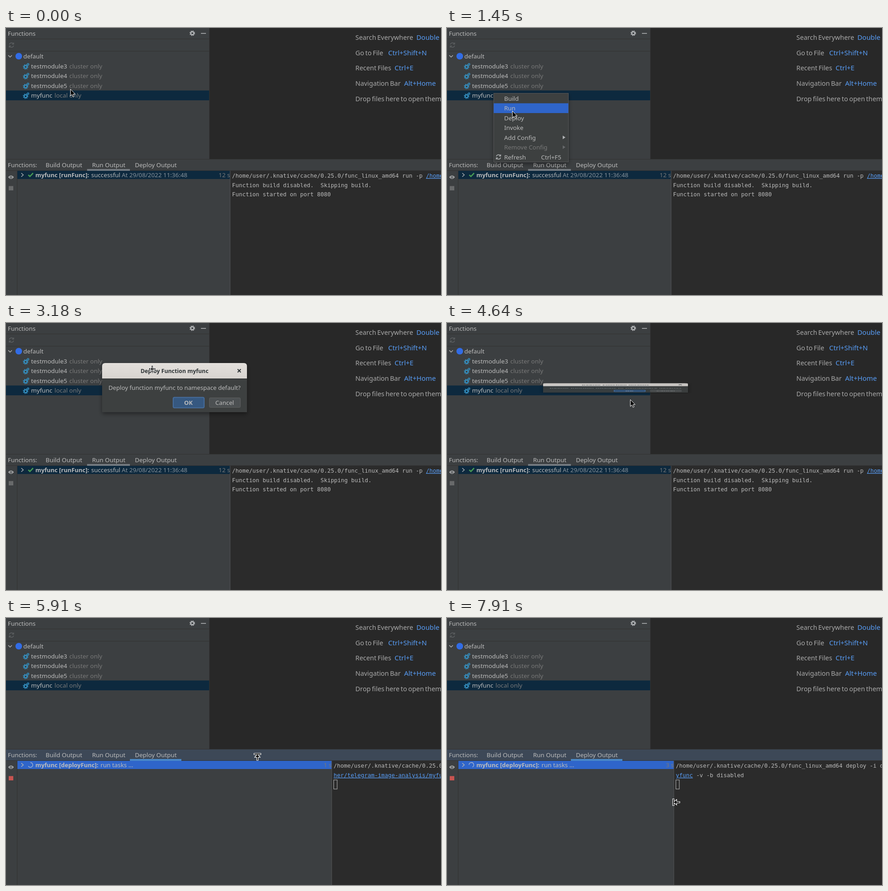
An HTML page for the animation above (8 s loop, 955 by 587 pixels).

```html
<!DOCTYPE html>
<html lang="en">
<head>
<meta charset="utf-8">
<title>Deploy a function</title>
<style>
  html, body { margin: 0; width: 100%; height: 100%; overflow: hidden; background: #3c3f41; }
  svg { display: block; width: 955px; height: 587px; }
  text { font: 13.35px "Noto Sans", "Open Sans", sans-serif; fill: #bbb; white-space: pre; }
  text.b { font-weight: 700; font-size: 12.95px; }
  text.mono { font: 12.42px "DejaVu Sans Mono", "Noto Sans Mono", monospace; }
  text.tip { font-size: 14.4px; word-spacing: -1.2px; fill: #a9a9a9; }
  text.key { font-size: 14.9px; word-spacing: -1.2px; fill: #589df6; }
  text.dim { fill: #787878; }
  text.ask { font-size: 13.15px; }
  text.title { font-size: 12.3px; font-weight: 700; fill: #2e3436; }
  .link { fill: #589df6; text-decoration: underline; }
</style>
</head>
<body>
<svg viewBox="0 0 955 587" xmlns="http://www.w3.org/2000/svg">
  <defs>
    <linearGradient id="bar" x2="0" y2="1">
      <stop stop-color="#e3dfdb"/><stop offset="1" stop-color="#d8d4d0"/>
    </linearGradient>
    <filter id="shade" x="-20%" y="-30%" width="140%" height="170%">
      <feDropShadow dx="0" dy="4" stdDeviation="5" flood-color="#000" flood-opacity=".4"/>
    </filter>
    <g id="refresh" fill="none" stroke-width="1.5">
      <path d="M-4.8-1.2A5 5 0 0 1 4-3M4.8 1.2A5 5 0 0 1-4 3"/>
      <path d="M4.8-5.5V-2H1.2M-4.8 5.5V2H-1.2"/>
    </g>
    <g id="gears" fill="none" stroke="#3592c4">
      <circle r="3.1" stroke-width="2"/>
      <circle r="4.9" stroke-width="2" stroke-dasharray="1.9 1.95"/>
      <circle cx="5.3" cy="-5.6" r="1.5" stroke-width="1.2"/>
      <circle cx="5.3" cy="-5.6" r="2.5" stroke-width="1.1" stroke-dasharray="1.3 1.32"/>
    </g>
    <path id="arrow" d="M.5.5V15.3L4 12.1 6.3 17.5 8.8 16.4 6.5 11.2H11Z" stroke="#fff" stroke-linejoin="round"/>
    <path id="edge" d="M-7.5-7.5H7.5V-4.5H1.2L6 1.2H1.5V8H-1.5V1.2H-6L-1.2-4.5H-7.5Z" stroke="#fff" stroke-width="1.2"/>
    <g id="move" stroke="#fff" stroke-linejoin="round">
      <path d="M0-8 3.5-4.2H-3.5ZM0 8 3.5 4.2H-3.5ZM-8 0-4.2-3.5V3.5ZM8 0 4.2-3.5V3.5Z"/>
      <circle r="3.6"/><circle r="1.2" fill="#fff" stroke="none"/>
    </g>
  </defs>
  <g id="scene"></g>
</svg>
<script>
const FPS = 11, LOOP = 8000, LAST = 87;
const BLUE = '#2f65ca', NAVY = '#0d293e', PANEL = '#3c3f41', FOCUS = '#3d4857', LINE = '#323232';
const CHAR = 7.476;
const COMMAND = '/home/user/.knative/cache/0.25.0/func_linux_amd64';
const PATH_END = 'her/telegram-image-analysis/myfunc';

// Pointer and splitter positions: [tick, x, y], linear between entries.
const POINTER = [
  [0, 141, 134], [1, 114, 143], [2, 102, 141], [10, 102, 141], [13, 124, 158], [16, 143, 182],
  [19, 157, 193], [20, 157, 193], [21, 148, 193], [26, 148, 193], [30, 850, 108], [35, 321, 101],
  [36, 321, 101], [41, 419, 152], [44, 402, 168], [56, 402, 168], [59, 421, 199], [65, 552, 305],
  [68, 732, 402], [72, 718, 404], [77, 718, 404], [81, 582, 404], [87, 503, 405]
];
const SPLIT = [[77, 715], [81, 579], [87, 498]];

function along(keys, k) {
  const i = keys.findIndex(key => key[0] >= k);
  if (i < 0) return keys[keys.length - 1].slice(1);
  if (i === 0) return keys[0].slice(1);
  const a = keys[i - 1], b = keys[i], p = (k - a[0]) / (b[0] - a[0]);
  return a.slice(1).map((v, j) => v + (b[j + 1] - v) * p);
}

const rect = (x, y, w, h, fill, more = '') =>
  `<rect x="${x}" y="${y}" width="${w}" height="${h}" fill="${fill}" ${more}/>`;
const text = (x, y, str, cls = '', more = '') =>
  `<text x="${x}" y="${Math.round(y)}" class="${cls}" ${more}>${str}</text>`;
const stroke = (d, color, width = 1.5) => `<path d="${d}" fill="none" stroke="${color}" stroke-width="${width}"/>`;
const use = (id, x, y, more = '') => `<use href="#${id}" transform="translate(${x} ${y}) ${more}"/>`;
const icon = (x, y, color) => `<g stroke="${color}">${use('refresh', x, y)}</g>`;

function functionsPanel(focused) {
  const modules = ['testmodule3', 'testmodule4', 'testmodule5'];
  return rect(0, 0, 446, 24, focused ? FOCUS : PANEL)
    + rect(0, 23.5, 446, 1, LINE) + rect(0, 50.5, 446, 1, LINE)
    + text(4, 17, 'Functions')
    + `<g fill="none" stroke="#afb1b3" transform="translate(409 11.5)"><circle r="3.3" stroke-width="2.4"/>
       <circle r="5" stroke-width="2" stroke-dasharray="2.2 1.727"/></g>`
    + rect(428, 11, 11, 1.6, '#afb1b3')
    + icon(12, 37.5, '#5c5f61')
    + stroke('M5 60 9 64 13 60', '#afb1b3')
    + '<circle cx="28" cy="62" r="7.3" fill="#326ce5"/>'
    + text(38, 67, 'default')
    + rect(0, 137.4, 446, 21.6, focused ? BLUE : NAVY)
    + modules.map((name, i) => {
      const y = 84 + i * 21.5;
      return use('gears', 43, y + 1.5) + text(55, y + 4.8, name) + text(139, y + 4.8, 'cluster only', 'dim');
    }).join('')
    + use('gears', 43, 150) + text(55, 153, 'myfunc') + text(106.5, 153, 'local only', 'dim');
}

function editor() {
  const tips = [['Search Everywhere', 901, 'Double Shift'], ['Go to File', 839, 'Ctrl+Shift+N'],
    ['Recent Files', 853, 'Ctrl+E'], ['Navigation Bar', 874, 'Alt+Home'], ['Drop files here to open them', 0, '']];
  return rect(446, 0, 509, 288, '#282828') + rect(446, 0, 1, 288, LINE)
    + tips.map(([label, x, key], i) =>
      text(767, 26 + i * 33.7, label, 'tip') + (key && text(x, 26 + i * 33.7, key, 'key'))).join('');
}

function consoleText(deploying, split, k) {
  const x = split + 4.3;
  if (!deploying) {
    return text(x, 329, `${COMMAND} run -p <tspan class="link">/home/user</tspan>`, 'mono')
      + text(x, 349.7, 'Function build disabled.  Skipping build.', 'mono')
      + text(x, 370.4, 'Function started on port 8080', 'mono');
  }
  if (k < 55) return '';
  const wrapped = Math.floor((715 - split) / CHAR + .3);
  return text(x, 329, `${COMMAND} deploy -i d`, 'mono')
    + text(x, 349.7, `<tspan class="link">${PATH_END.slice(wrapped)}</tspan> -v -b disabled`, 'mono')
    + rect(x + .2, 356, 7.5, 20, 'none', 'stroke="#bbb"');
}

function taskRow(deploying, split, k) {
  const row = rect(25, 314, split - 25, 18, deploying ? BLUE : NAVY) + stroke('M33.5 319 38 323 33.5 327', '#afb1b3');
  const elapsed = k * 1000 / FPS - 4900;
  const time = !deploying ? '12 s'
    : elapsed < 990 ? `${Math.max(1, Math.round(elapsed))} ms` : `${Math.floor((elapsed + 15) / 1000)} s`;
  const timer = text(split, 328, time, 'dim', 'text-anchor="end"');
  if (!deploying) {
    return row + stroke('M49 323 52.5 326.5 59.5 319', '#499c54', 2.6)
      + text(64.5, 328, 'myfunc [runFunc]:', 'b') + text(187, 328, 'successful')
      + text(254, 328, 'At 29/08/2022 11:36:48', '', 'style="fill:#87919a"') + timer;
  }
  const turn = k * 1000 / FPS / 725 * 360 - 54;
  return row + `<path d="M0-5.2A5.2 5.2 0 1 1-4.5 2.6" transform="translate(53.5 323) rotate(${turn})"
      fill="none" stroke="#aeb9cf" stroke-width="1.3"/>`
    + text(64.5, 328, 'myfunc [deployFunc]:', 'b') + text(207.5, 328, 'run tasks ...') + timer;
}

function outputPanel(deploying, split, k) {
  return rect(0, 288, 955, 26, deploying ? FOCUS : PANEL) + rect(0, 288, 955, 1, LINE) + rect(0, 313, 955, 1, LINE)
    + text(4, 306, 'Functions:') + text(87, 306, 'Build Output')
    + text(189, 306, 'Run Output') + text(283, 306, 'Deploy Output')
    + (deploying ? rect(272, 310, 113, 4, '#4a88c7') : rect(178, 310, 94, 4, '#747a80'))
    + rect(0, 314, 955, 273, PANEL) + rect(24, 314, 1, 273, LINE)
    + '<path d="M5 328Q11 320.5 17 328 11 335.5 5 328Z" fill="#afb1b3"/>'
    + '<circle cx="11" cy="328" r="2.6" fill="#3c3f41"/><circle cx="11" cy="328" r="1.3" fill="#afb1b3"/>'
    + rect(6, 347.5, 10, 9.5, deploying ? '#c75450' : '#686a6b')
    + taskRow(deploying, split, k)
    + rect(split, 314, 955 - split, 273, '#2b2b2b') + rect(split - .5, 314, 1, 273, '#555759')
    + consoleText(deploying, split, k);
}

function menu(pointerY, opacity) {
  const items = ['Build', 'Run', 'Deploy', 'Invoke', 'Add Config', 'Remove Config', 'Refresh'];
  const active = Math.floor((pointerY - 144) / 21.5);
  const arrow = (y, color) => `<path d="M254 ${y - 4}L260 ${y}L254 ${y + 4}Z" fill="${color}"/>`;
  return `<g opacity="${opacity}">`
    + rect(102.5, 143.5, 164, 151, PANEL, 'stroke="#555759" filter="url(#shade)"')
    + (active >= 0 ? rect(102.5, 144 + active * 21.5, 164, 21.5, BLUE) : '')
    + items.map((item, i) => text(125.5, 159.7 + i * 21.5, item, i === 5 ? 'dim' : '')).join('')
    + arrow(240.5, '#afb1b3') + arrow(262, '#66686a')
    + icon(113, 283.5, '#afb1b3') + text(206.5, 288.7, 'Ctrl+F5') + '</g>';
}

function dialog(x, y, squash) {
  return `<g transform="translate(${x} ${y + 55}) scale(1 ${squash}) translate(0 -55)" opacity="${squash < 1 ? .88 : 1}">
    <path d="M0 108V7Q0 0 7 0H311Q318 0 318 7V108Z" fill="${PANEL}" filter="url(#shade)"/>
    <path d="M0 34V7Q0 0 7 0H311Q318 0 318 7V34Z" fill="url(#bar)"/>`
    + rect(0, 34, 318, 1, '#2d2f30')
    + text(159, 22, 'Deploy Function myfunc', 'title', 'text-anchor="middle"')
    + stroke('M297.5 13.5 304.5 20.5M304.5 13.5 297.5 20.5', '#2e3436', 2)
    + text(14, 59, 'Deploy function myfunc to namespace default?', 'ask')
    + rect(156, 75.5, 68, 23, '#365880', 'rx="3" stroke="#466d9c" stroke-width="2"')
    + text(189.5, 92, 'OK', 'b', 'text-anchor="middle"')
    + rect(235.5, 76.5, 68, 21, '#4c5052', 'rx="2" stroke="#5e6060"')
    + text(269, 92, 'Cancel', 'ask', 'text-anchor="middle"') + '</g>';
}

function pointer(k, x, y) {
  if (k >= 30 && k <= 36) return use('move', x, y);
  if (k === 64 || k === 65) return use('edge', x, y);
  if (k >= 70) return use('edge', x, y, 'rotate(-90)');
  return use('arrow', x, y);
}

function scene(k) {
  const [x, y] = along(POINTER, k);
  const deploying = k >= 54;
  const split = deploying ? along(SPLIT, k)[0] : 492;
  let out = functionsPanel(k === 6 || k === 7) + editor() + outputPanel(deploying, split, k);
  if (k >= 8 && k < 23) out += menu(y, k === 8 ? .6 : 1);
  if (k >= 23 && k < 52) {
    const [px, py] = along(POINTER, Math.min(Math.max(k, 30), 35));
    out += dialog(px - 110, py - 13, k === 23 || k === 51 ? .19 : 1);
  }
  return out + pointer(k, x, y);
}

const root = document.getElementById('scene');
const start = performance.now();
let shown = -1;
function draw() {
  const time = (performance.now() - start) % LOOP;
  const k = Math.min(LAST, Math.floor((time + 5) * FPS / 1000));
  if (k !== shown) root.innerHTML = scene(shown = k);
  requestAnimationFrame(draw);
}
draw();
</script>
</body>
</html>
```
